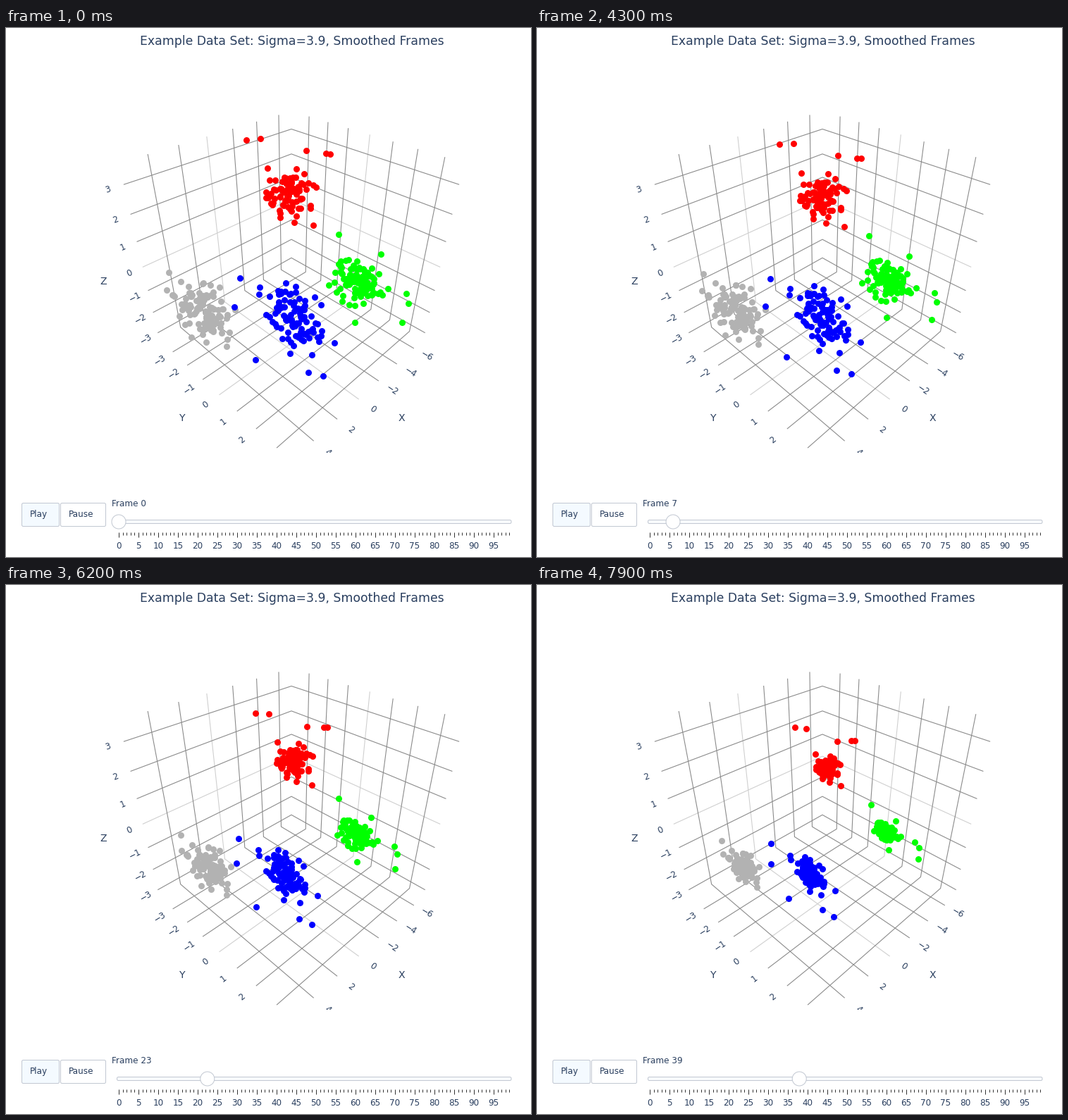
Animation, 745 px wide and 751 px high, one loop 8000 ms. Source, as a matplotlib script:

```python
import math

import matplotlib.pyplot as plt
import numpy as np
from matplotlib.animation import FuncAnimation
from matplotlib.patches import Circle, FancyBboxPatch, Rectangle

W, H = 745, 751
PX = 0.72  # points per pixel at 100 dpi
INK, EDGE = "#2a3f5f", "#c2c8d2"
TOP, FLOOR = 0.522, -0.475
FRAMES, START, LAST = 80, 36, 39

plt.rcParams["font.family"] = "DejaVu Sans"
fig = plt.figure(figsize=(W / 100, H / 100), dpi=100, facecolor="white")
ax = fig.add_axes([0, 0, 1, 1])
ax.set(xlim=(0, W), ylim=(H, 0))
ax.axis("off")


def text(x, y, s, size, **kw):
    kw = {"ha": "center", "va": "baseline", "color": INK, **kw}
    return ax.text(x, y, s, fontsize=size * PX, **kw)


def box(x0, y0, x1, y1, fill):
    ax.add_patch(FancyBboxPatch(
        (x0, y0), x1 - x0, y1 - y0, fc=fill, ec=EDGE, lw=PX, zorder=5,
        boxstyle="round,pad=0,rounding_size=2"))


def project(x, y, z):
    """Perspective view of the unit cube along its diagonal."""
    scale = 648 / (2.175 - (x + y + z) / math.sqrt(3))
    return (405 + scale * (y - x) / math.sqrt(2),
            339.2 - scale * (2 * z - x - y) / math.sqrt(6))


def grid_line(value, path, outer):
    pts = [project(*p) for p in path]
    color = "#cfcfcf" if value == 0 else "#8a8a8a"
    ax.plot(*zip(*pts), color=color, lw=1.1 * PX, zorder=1 if value == 0 else 1.5)
    (x0, y0), (x1, y1) = pts[-1], project(*outer)
    angle = math.degrees(math.atan2(y0 - y1, x1 - x0))
    angle = (angle + 90) % 180 - 90
    label = str(value).replace("-", "\u2212")
    text(x1, y1, label, 12, va="center", rotation=angle)


def draw_axes():
    for v in range(-6, 5, 2):
        x = 0.058 + 0.0773 * v
        grid_line(v, [(x, -.5, TOP), (x, -.5, FLOOR), (x, .5, FLOOR)], (x, .58, FLOOR))
    for v in range(-3, 4):
        y = 0.022 + 0.1306 * v
        z = 0.1423 * v
        grid_line(v, [(-.5, y, TOP), (-.5, y, FLOOR), (.5, y, FLOOR)], (.58, y, FLOOR))
        grid_line(v, [(-.5, .5, z), (-.5, -.5, z), (.5, -.5, z)], (.572, -.5, z))
    # Labels end at the lower border of the scene.
    ax.add_patch(Rectangle((140, 603), 480, 40, fc="white", ec="none", zorder=4))
    for name, x, y in (("X", 561, 558), ("Y", 250, 558), ("Z", 138, 364)):
        text(x, y, name, 14)


def tick_x(i):
    return 160 + 5.6 * i


def draw_controls():
    text(405.5, 24, "Example Data Set: Sigma=3.9, Smoothed Frames", 17.3)
    box(22.5, 674.5, 75.5, 707.5, "#f4faff")
    box(77.5, 674.5, 141.5, 707.5, "white")
    text(34, 694, "Play", 12, ha="left", zorder=6)
    text(89, 694, "Pause", 12, ha="left", zorder=6)
    box(157.5, 698.5, 717, 703.5, "#f8fafc")
    for i in range(100):
        major = i % 5 == 0
        ax.plot([tick_x(i)] * 2, [716, 723 if major else 720], color="#333333",
                lw=PX, solid_capstyle="butt")
        if major:
            text(tick_x(i), 739, str(i), 12)


class Cluster:
    """Normal cloud plus a few outliers, all drawn towards a drifting centre."""

    def __init__(self, color, seed, start, end, tilt, along, across, squeeze,
                 outliers, count=92):
        rng = np.random.default_rng(seed)
        r = np.sqrt(-2 * np.log(1 - 0.95 * rng.random(count)))
        a = rng.uniform(0, 2 * np.pi, count)
        c, s = math.cos(math.radians(tilt)), math.sin(math.radians(tilt))
        self.axes = np.array([[c, s], [-s, c]])
        self.start, self.end = np.array(start), np.array(end)
        self.squeeze = squeeze
        cloud = np.column_stack([along * r * np.cos(a), across * r * np.sin(a)])
        far = (np.array(outliers) - self.start) @ self.axes.T
        self.offset = np.vstack([far, cloud])
        self.dist = np.hypot(*self.offset.T)
        self.dots = ax.scatter([], [], s=(9 * PX) ** 2, color=color, lw=0, zorder=3)

    def move(self, u):
        # Close points are pulled in strongly and early, distant ones late.
        pull = 0.6 * np.exp(-(self.dist / 100) ** 2)
        keep = 1 - pull * u ** (0.9 + self.dist / 200)
        shape = np.array([1, 1 - self.squeeze * u])
        centre = self.start + (self.end - self.start) * u
        self.dots.set_offsets(centre + (self.offset * keep[:, None] * shape) @ self.axes)


draw_axes()
draw_controls()

clusters = [
    Cluster("#b2b2b2", 4, (278, 404), (292, 401), 60, 25, 15, 0.1,
            [(231, 347), (228, 372), (303, 368), (325, 400), (313, 452)]),
    Cluster("#ff0000", 11, (401, 233), (411, 258), 60, 19, 17, 0,
            [(341, 159), (361, 157), (426, 174), (454, 178), (460, 179), (436, 280)]),
    Cluster("#00ff00", 7, (499, 361), (496, 350), 38, 20, 15, 0.3,
            [(472, 293), (532, 321), (568, 377), (571, 391), (562, 418), (495, 418)]),
    Cluster("#0000ff", 23, (406, 411), (386, 410), 47, 28, 18, 0.15,
            [(332, 355), (324, 396), (354, 471), (429, 489), (450, 494), (466, 447)]),
]
knob = ax.add_patch(Circle((160, 701), 10, fc="white", ec=EDGE, lw=PX, zorder=7))
caption = text(150, 679, "", 12, ha="left")


def update(i):
    step = max(0, i - START)
    clock = 0.89 * step + 0.77
    count = int(clock)
    for cluster in clusters:
        cluster.move(count / LAST)
    # The knob trails the counter and catches up late in each step.
    lag = 1.1 - 1.1 * max(0, clock - count - 0.4)
    knob.center = (tick_x(max(0, count - lag)), 701)
    caption.set_text(f"Frame {count}")
    return [c.dots for c in clusters] + [knob, caption]


anim = FuncAnimation(fig, update, frames=FRAMES, interval=100, repeat=True,
                     repeat_delay=0, blit=False)
plt.show()
```
